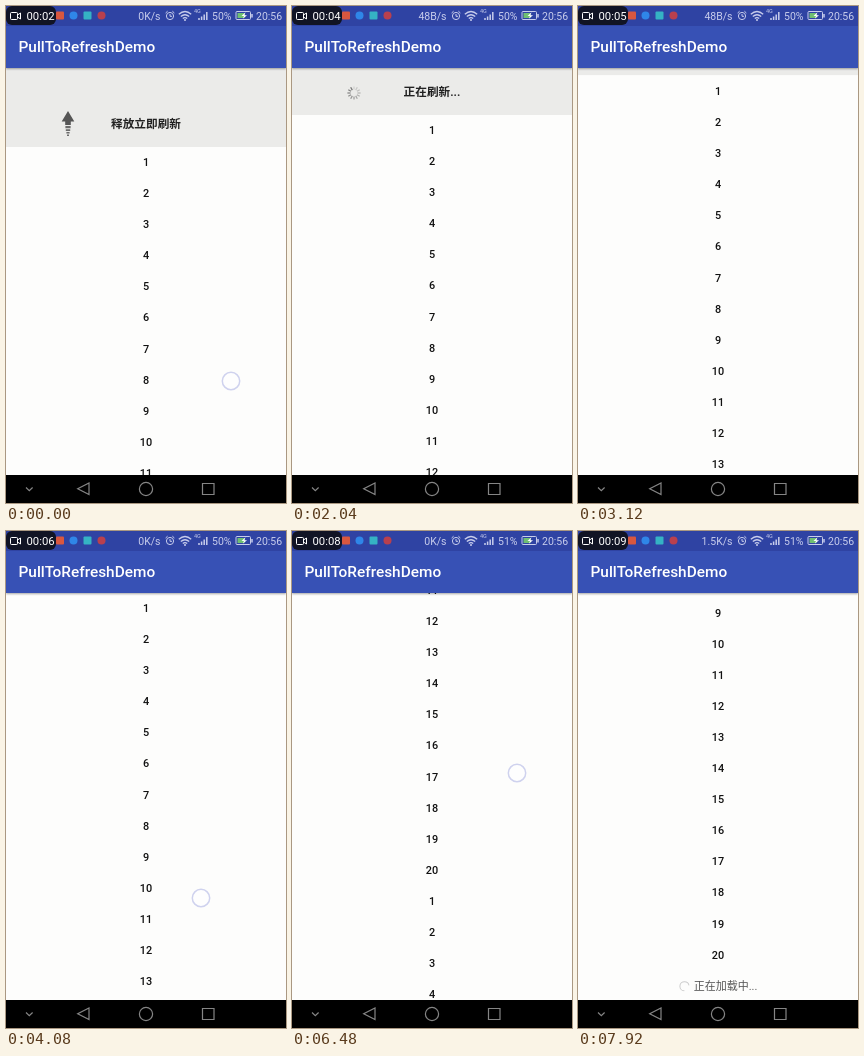
Animation, 280 px wide and 497 px high, one loop 8000 ms. Source, as an HTML page:

```html
<!DOCTYPE html>
<html lang="zh">
<head>
<meta charset="utf-8">
<title>PullToRefreshDemo</title>
<style>
  html, body { margin: 0; width: 100%; height: 100%; overflow: hidden; background: #fdfdfc; }
  #stage { position: relative; width: 280px; height: 497px; overflow: hidden; background: #fdfdfc;
    font-family: Roboto, "Noto Sans CJK SC", "Noto Sans CJK", sans-serif; color: #111; }
  #stage > * { position: absolute; left: 0; width: 280px; }
  #header { top: 62px; height: 140px; margin-top: -140px; background: #ebebe9; }
  #header span { position: absolute; bottom: 14px; width: 280px; text-align: center;
    font-size: 11.67px; line-height: 18px; font-weight: 700; color: #222; }
  #header svg { position: absolute; left: 52px; bottom: 7.5px; }
  #list { top: 0; }
  #list div { height: 31.1px; line-height: 31.1px; text-align: center; font-size: 10.9px; font-weight: 500; }
  #list .footer { display: flex; align-items: center; justify-content: center; gap: 4px;
    font-size: 11px; font-weight: 400; color: #555; }
  #bar { top: 20px; height: 42px; background: #3751b5; box-shadow: 0 1px 2px rgba(0,0,0,.35);
    color: #fff; font-size: 15.4px; font-weight: 500; line-height: 43px; text-indent: 12.5px; }
  #status, #nav { height: 20px; top: 0; }
  #status text { font-size: 10.5px; fill: #c8cdec; }
  #nav { top: 469px; height: 28px; background: #000; }
  #touch { left: -10px !important; top: -10px; width: 20px !important; height: 20px; }
</style>
</head>
<body>
<div id="stage">
  <div id="list"></div>
  <div id="header">
    <svg id="arrow" width="20" height="30" fill="#555">
      <path d="M10 1L16.3 11.5H12.8V15H7.2V11.5H3.7Z"/>
      <path d="M7.4 16h5.2v2.2H7.4zM7.8 19.2h4.4v1.8H7.8zM8.4 22h3.2v1.5H8.4zM9 24.5h2v1.4H9z" opacity=".85"/>
    </svg>
    <svg id="ticks" width="20" height="30"></svg>
    <span id="message"></span>
  </div>
  <div id="bar">PullToRefreshDemo</div>
  <svg id="status" viewBox="0 0 280 20">
    <path fill="#2f43a3" d="M0 0H280V20H0Z"/>
    <rect width="50" height="19" rx="6" fill="#111425"/>
    <g fill="none" stroke="#fff">
      <rect x="4.5" y="6.5" width="7" height="7" rx="1"/>
      <path d="M11.5 9L14.5 7V13L11.5 11"/>
    </g>
    <text id="clock" x="20.5" y="14" style="font-size:11.3px;fill:#fff"></text>
    <rect x="50" y="5.5" width="8" height="8" rx="1" fill="#d9573f"/>
    <circle cx="67.5" cy="9.5" r="4" fill="#2f86e8"/>
    <rect x="77.5" y="5.5" width="8" height="8" rx="1" fill="#35b3c4"/>
    <circle cx="95.5" cy="9.5" r="4" fill="#b9404e"/>
    <text id="speed" x="154.5" y="13.5" text-anchor="end"></text>
    <g fill="none" stroke="#c8cdec">
      <circle cx="164" cy="10" r="3.6"/>
      <path d="M164 8V10.3H166M159.6 7L161.6 5.2M168.4 7L166.4 5.2"/>
      <path d="M172.8 8.2Q179 2.8 185.2 8.2M174.8 10.5Q179 7 183.2 10.5M176.8 12.6Q179 10.8 181.2 12.6" stroke-width="1.3"/>
      <path d="M193 14V12M195.6 14V10.5M198.2 14V8.5M200.8 14V6" stroke-width="1.5"/>
      <rect x="230" y="5.5" width="14.5" height="8" rx="1"/>
      <path d="M246 8V11.5" stroke-width="1.5"/>
    </g>
    <circle cx="179" cy="14" r="1" fill="#c8cdec"/>
    <text x="188" y="7" style="font-size:5.5px">4G</text>
    <text id="charge" x="206" y="13.5"></text>
    <path fill="#6fbf73" d="M231.5 7H238.5V12H231.5Z"/>
    <path fill="#fff" d="M239.5 6.3L235.5 10H238L236.8 12.8L241 9.2H238.4Z"/>
    <text x="250" y="13.5">20:56</text>
  </svg>
  <svg id="nav" viewBox="0 0 280 28" fill="none" stroke="#858585" stroke-width="1.2">
    <path d="M20 12.5L23.3 15.7L26.6 12.5M83 8V19.6L71.7 13.8Z"/>
    <circle cx="140" cy="14" r="6.6"/>
    <path d="M196.5 8.5H208V19.5H196.5Z"/>
  </svg>
  <svg id="touch"><circle cx="10" cy="10" r="8.7" fill="#fff" fill-opacity=".6" stroke="#cfd2ee" stroke-width="1.5"/></svg>
</div>
<script>
const LOOP = 8000, STEP = 120, ROW = 31.1, PAGE = 20;
const $ = id => document.getElementById(id);
const linear = p => p;
const easeOut = p => 1 - (1 - p) ** 3;
const settle = p => 1 - (1 - p) ** 3.7;

// Centre of the first row: [time, y, easing towards this point]
const scroll = [[0, 157], [840, 181.5], [1320, 186], [1700, 186], [2040, 125, easeOut],
  [2880, 125], [3480, 78, settle], [4080, 78], [4200, 22], [4320, -75], [4680, -166.7, easeOut],
  [6240, -166.7], [6480, -251.7], [6600, -335], [7260, -788.7, easeOut]];

// Finger strokes: [time, x, y]
const strokes = [
  [[0, 225, 375], [840, 226, 452], [1320, 226, 466], [1700, 226, 466]],
  [[3960, 195, 372], [4080, 195, 367], [4200, 196, 310], [4320, 197, 215]],
  [[6240, 225, 327], [6480, 225, 242], [6600, 224, 160]]
];

function track(points, t, column = 1, ease = linear) {
  const next = points.findIndex(point => point[0] > t);
  if (next < 0) return points[points.length - 1][column];
  const a = points[next - 1], b = points[next];
  return a[column] + (b[column] - a[column]) * ease((t - a[0]) / (b[0] - a[0]));
}

function scrollAt(t) {
  const next = scroll.find(point => point[0] > t);
  return track(scroll, t, 1, next && next[2]);
}

const rows = Array.from({ length: PAGE * 2 }, (_, i) => {
  const row = document.createElement('div');
  row.textContent = i % PAGE + 1;
  $('list').append(row);
  return row;
});
$('list').insertAdjacentHTML('beforeend', `<div class="footer">
  <svg width="11" height="11"><circle id="ring" cx="5.5" cy="5.5" r="4.6" fill="none"
    stroke="#ccc" stroke-dasharray="20 9"/></svg><span>正在加载中...</span></div>`);

$('ticks').innerHTML = `<g id="wheel">${Array.from({ length: 12 }, (_, i) =>
  `<path d="M10 11.6V8.4" stroke="#666" stroke-width="1.3" opacity="${0.2 + i * 0.06}"
    transform="rotate(${i * 30} 10 15)"/>`).join('')}</g>`;

function draw(t) {
  const y = scrollAt(t);
  const refreshing = t > 1700;
  $('list').style.transform = `translateY(${y - ROW / 2}px)`;
  $('header').style.transform = `translateY(${Math.max(0, y - 78)}px)`;
  $('arrow').style.display = refreshing ? 'none' : '';
  $('ticks').style.display = refreshing ? '' : 'none';
  $('message').textContent = refreshing ? '正在刷新...' : '释放立即刷新';
  rows.forEach((row, i) => { row.style.display = i < PAGE || t >= 5640 ? '' : 'none'; });

  const turn = Math.floor(t / 83) * 30;
  $('wheel').setAttribute('transform', `rotate(${turn} 10 15)`);
  $('ring').setAttribute('transform', `rotate(${t * 0.36 + 120} 5.5 5.5)`);

  const second = 3 + Math.floor((t - 800) / 1050);
  $('clock').textContent = '00:' + String(second).padStart(2, '0');
  $('speed').textContent = t < 720 ? '0K/s' : t < 3720 ? '48B/s' : t < 6720 ? '0K/s' : '1.5K/s';
  $('charge').textContent = t < 4440 ? '50%' : '51%';

  const stroke = strokes.find(s => t >= s[0][0] && t <= s[s.length - 1][0]);
  $('touch').style.display = stroke ? '' : 'none';
  if (stroke) $('touch').style.transform = `translate(${track(stroke, t)}px, ${track(stroke, t, 2)}px)`;
}

const start = performance.now();
function tick() {
  const t = (performance.now() - start) % LOOP;
  draw(Math.floor(t / STEP) * STEP);
  requestAnimationFrame(tick);
}
tick();
</script>
</body>
</html>
```
